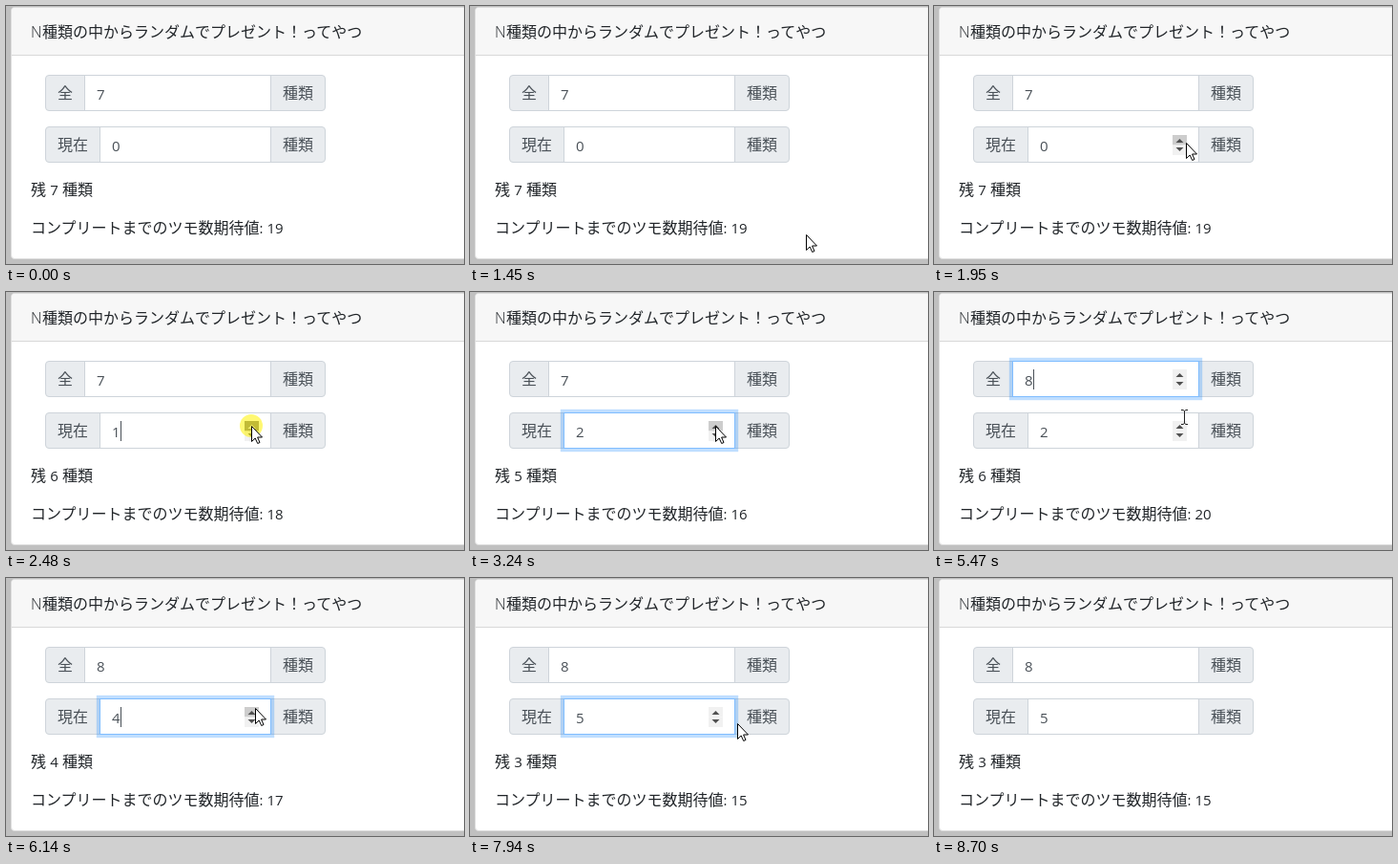
Write an HTML page that moves like this. It is 480 by 270 pixels and loops after 8.73 s.

```html
<!DOCTYPE html>
<html lang="ja">
<head>
<meta charset="utf-8">
<title>ツモ数期待値</title>
<style>
html, body { margin: 0; width: 100%; height: 100%; overflow: hidden; background: #c0c0c0; }
svg { display: block; width: 100%; height: 100%; }
text { font: 350 16px "Open Sans", "Noto Sans CJK JP", "Noto Sans CJK", sans-serif; fill: #212529; white-space: pre; }
.muted { fill: #495057; }
.addon { fill: #e9ecef; stroke: #ced4da; }
.input { fill: #fff; stroke: #ced4da; }
.glow { fill: #007bff; }
.edge { fill: none; stroke: #80bdff; }
.caret { fill: #495057; }
.num { font-size: 15px; font-weight: 400; }
#halo { fill: #fff200; opacity: .55; }
</style>
</head>
<body>
<svg id="stage" viewBox="0 0 480 270" preserveAspectRatio="none">
  <rect width="480" height="270" fill="#c0c0c0"/>
  <rect x="5.5" y="1.5" width="500" height="263" rx="3.5" fill="#fff" stroke="#dfdfdf"/>
  <path d="M6 51V5.500Q6 2 9.500 2H480V51Z" fill="#f7f7f7"/>
  <path d="M6 51.500H480" stroke="#d8d8d8"/>
  <text x="26" y="33">N<tspan dx=".4">種類の中からランダムでプレゼント！ってやつ</tspan></text>
  <g id="fields"></g>
  <text x="26" y="198">残 <tspan class="num" id="left"></tspan> 種類</text>
  <text x="26" y="238">コンプリートまでのツモ数期待値<tspan class="num" id="hope"></tspan></text>
  <circle id="halo" r="12"/>
  <g id="pointer">
    <path id="arrow" d="M.5 .5V16.500L4.200 13 6.700 18.500 9 17.500 6.600 12H11.500Z" fill="#fff" stroke="#000"/>
    <path id="beam" d="M-3 -7.500H-1L.5 -6.500 2 -7.500H4M.5 -6.500V6.500M-3 7.500H-1L.5 6.500 2 7.500H4" fill="none" stroke="#222"/>
  </g>
</svg>
<script>
const LOOP = 8730, BLINK = 1050, FADE = 150;
const $ = id => document.getElementById(id);
const show = (el, on) => el.setAttribute('visibility', on ? 'visible' : 'hidden');
const smooth = u => u * u * (3 - 2 * u);
const clamp = u => Math.max(0, Math.min(1, u));
const within = (spans, t) => spans.some(([a, b]) => t >= a && t < b);

// Pointer stops: time, x, y
const path = [
  [640, 396, 272], [980, 349, 243], [1230, 349, 243], [1250, 352, 239],
  [1450, 352, 239], [1750, 264, 143], [1950, 264, 143], [1990, 260, 137], [2030, 257, 140],
  [4250, 257, 140], [4520, 258, 92], [4540, 258, 92], [4610, 258, 87],
  [5100, 258, 87], [5470, 262, 131], [5520, 262, 131], [5650, 261, 136],
  [7830, 261, 136], [8350, 425, 273]
];
const presses = [[2180, 2620], [2710, 2830], [4820, 5000], [5830, 5920], [6030, 6120], [6230, 6370]];

const fields = [
  { label: '全', x: 82, y: 72, start: 7, bumps: [4995], focus: [[4850, 5850]], rings: [[4850, 5850]] },
  { label: '現在', x: 98, y: 126, start: 0, bumps: [2300, 2715, 5860, 6060, 6255],
    focus: [[2200, 4850], [5850, 8580]], rings: [[2620, 4850], [5850, 8560]] }
];

for (const f of fields) {
  const { x, y } = f, w = 278 - x, g = document.createElementNS('http://www.w3.org/2000/svg', 'g');
  g.innerHTML = `
    <rect class="addon" x="41.5" y="${y + .5}" width="293" height="37" rx="3.5"/>
    <text class="muted" x="54" y="${y + 25}">${f.label}</text>
    <text class="muted" x="290" y="${y + 25}">種類</text>
    <rect class="glow"/>
    <rect class="input" x="${x + .5}" y="${y + .5}" width="${w - 1}" height="37"/>
    <rect class="edge" x="${x + .5}" y="${y + .5}" width="${w - 1}" height="37"/>
    <text class="muted num value" x="${x + 13}" y="${y + 26}"></text>
    <rect class="caret" x="${x + 22}" y="${y + 9}" width="1" height="21"/>
    <g class="spin" transform="translate(250 ${y + 9})">
      <rect class="up" width="15" height="10.5"/><rect class="down" y="10.5" width="15" height="10.5"/>
      <path class="upMark" d="M3.500 8L7.500 4 11.500 8Z"/><path class="downMark" d="M3.500 13L7.500 17 11.500 13Z"/>
    </g>`;
  $('fields').append(g);
  for (const name of ['glow', 'edge', 'value', 'caret', 'spin', 'up', 'down', 'upMark', 'downMark'])
    f[name] = g.querySelector('.' + name);
}

function pointerAt(t) {
  let i = 0;
  while (i < path.length - 2 && t >= path[i + 1][0]) i++;
  const [a, x0, y0] = path[i], [b, x1, y1] = path[i + 1];
  const u = smooth(clamp((t - a) / (b - a)));
  return [x0 + (x1 - x0) * u, y0 + (y1 - y0) * u];
}

function paintButton(back, mark, over, down) {
  back.setAttribute('fill', over ? (down ? '#787878' : '#cdcdcd') : '#f1f1f1');
  mark.setAttribute('fill', over && down ? '#fff' : '#505050');
}

function paintField(f, t, px, py, down) {
  const { x, y } = f, w = 278 - x;
  const past = f.bumps.filter(b => b <= t);
  f.count = f.start + past.length;
  f.value.textContent = f.count;

  const ring = Math.max(...f.rings.map(([a, b]) =>
    smooth(clamp((t - a) / FADE)) * (1 - smooth(clamp((t - b) / (FADE - 10))))));
  const s = 3.2 * ring;
  Object.entries({ x: x - s, y: y - s, width: w + 2 * s, height: 38 + 2 * s, opacity: .25 * ring })
    .forEach(([k, v]) => f.glow.setAttribute(k, v));
  f.edge.setAttribute('opacity', ring);

  const focused = within(f.focus, t);
  const hover = px >= x && px < 278 && py >= y && py < y + 38;
  const top = y + 9, onSpin = hover && px >= 250 && px < 265 && py >= top && py < top + 21;
  const upper = py < top + 10.5;
  show(f.caret, focused && past.length && (t - past[past.length - 1]) % BLINK < BLINK / 2);
  show(f.spin, focused || hover);
  paintButton(f.up, f.upMark, onSpin && upper, down);
  paintButton(f.down, f.downMark, onSpin && !upper, down);
  return hover && !onSpin;
}

// Expected draws to collect every remaining kind
function expected(total, left) {
  let sum = 0;
  for (let k = 1; k <= left; k++) sum += total / k;
  return Math.ceil(sum);
}

function draw(t) {
  const [px, py] = pointerAt(t).map(Math.round), down = within(presses, t);
  const typing = fields.map(f => paintField(f, t, px, py, down)).some(Boolean);
  const total = fields[0].count, left = total - fields[1].count;
  $('left').textContent = left;
  $('hope').textContent = ': ' + expected(total, left);
  $('pointer').setAttribute('transform', `translate(${px} ${py})`);
  show($('arrow'), !typing);
  show($('beam'), typing);
  $('halo').setAttribute('cx', px);
  $('halo').setAttribute('cy', py);
  show($('halo'), down);
}

const begin = performance.now();
function tick() {
  draw((performance.now() - begin) % LOOP);
  requestAnimationFrame(tick);
}
tick();
</script>
</body>
</html>
```
